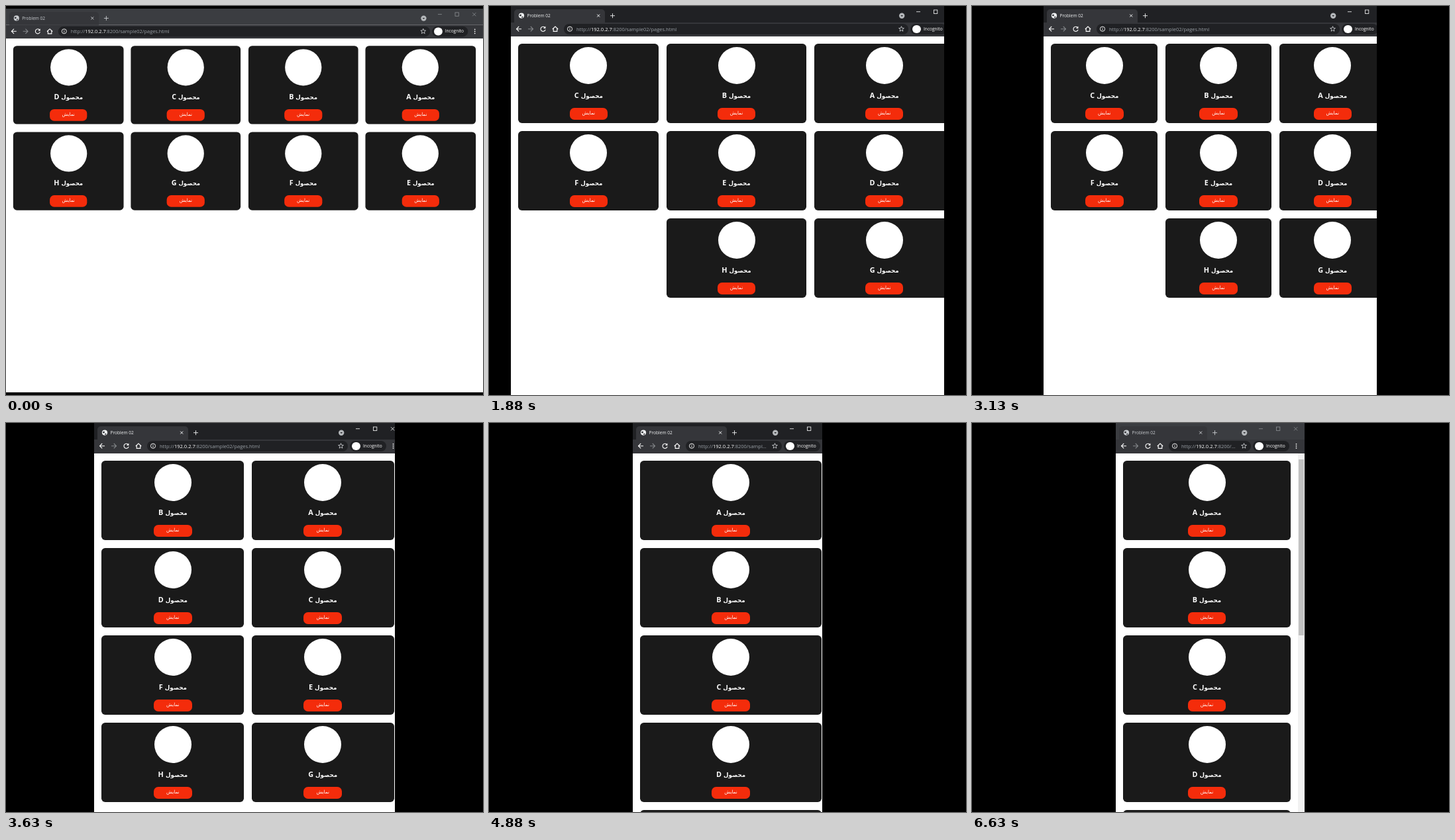
An HTML page that plays this animation: 720x588 px, repeating every 6760 ms.

```html
<!DOCTYPE html>
<html lang="en">
<head>
<meta charset="utf-8">
<title>Responsive product grid</title>
<style>
html, body { margin: 0; width: 100%; height: 100%; overflow: hidden; background: #000; }
#stage { position: relative; width: 720px; height: 588px; overflow: hidden; background: #000; }
#view { position: absolute; left: 0; top: 0; height: 588px; overflow: hidden; transform-origin: 0 0; }
#win {
  position: absolute; left: 0; top: 0; height: 588px; background: #fff;
  font-family: "Open Sans", "Noto Sans", sans-serif; color: #fff;
  --bar: #202124; --ink: #f1f3f4; --ctl: #fff;
}
#win.idle { --bar: #3b3d41; --ink: #c9ccd0; --ctl: #8d9094; }
#win svg, #win div, #win span { position: absolute; }
svg { overflow: visible; fill: none; stroke-linecap: butt; }

.bar { left: 0; right: 0; top: 0; height: 24.5px; background: var(--bar); }
#tab { left: 4.5px; top: 5px; height: 19.5px; background: #35363a; border-radius: 5px 5px 0 0; color: var(--ink); }
#tab span { left: 20px; top: 0; font-size: 6.6px; line-height: 19.5px; white-space: nowrap; }
.tool { left: 0; right: 0; top: 24.5px; height: 21px; background: #35363a; }
.pill { background: #202124; border-radius: 8.3px; top: 26.5px; height: 16.5px; }
.omni { left: 79.5px; right: 81.5px; }
.guest { right: 23px; width: 55px; }
.guest i { position: absolute; left: 3px; top: 2px; width: 12.6px; height: 12.6px; border-radius: 50%; background: #fff; }
.guest span { left: 20px; font-size: 6.6px; font-weight: 500; line-height: 16.5px; }
.url {
  left: 99px; right: 103px; top: 26.5px; font-size: 7.5px; line-height: 16.5px;
  white-space: nowrap; overflow: hidden; text-overflow: ellipsis; color: #9aa0a6;
}
.url b { font-weight: 400; color: #fff; }
.left { left: 0; top: 0; }
.right { right: 0; top: 0; }

#page { left: 0; top: 45.5px; bottom: 0; overflow: hidden; background: #fff; }
#grid {
  left: 0; right: 0; top: 0; padding: 11.4px; direction: rtl;
  display: grid; gap: 11.4px; grid-auto-rows: 120.6px;
}
#win .card { position: relative; background: #1a1a1a; border-radius: 5.7px; }
.card i {
  position: absolute; left: 50%; top: 5.2px; width: 56px; height: 56px;
  margin-left: -28px; border-radius: 50%; background: #fff;
}
.card h3 {
  position: absolute; left: 0; right: 0; top: 70px; margin: 0; text-align: center;
  font: bold 8.7px/16px "DejaVu Sans", sans-serif;
}
.card h3 b { font: bold 10.8px/16px "Open Sans", sans-serif; }
.card p {
  position: absolute; left: 50%; top: 97.6px; width: 57.4px; height: 17.4px; margin: 0 0 0 -28.7px;
  border-radius: 6.8px; background: #f42c0b; text-align: center;
  font: 7.2px/16.6px "DejaVu Sans", sans-serif;
}
#scroll { right: 0; top: 45.5px; bottom: 0; width: 10px; background: #f1f1f1; }
#scroll div { left: .6px; right: .6px; top: 9.6px; height: 266px; background: #c1c1c1; }
#cursor { position: absolute; left: 713.5px; top: 0; }
</style>
</head>
<body>
<div id="stage">
  <div id="view">
    <div id="win">
      <div class="bar"></div>
      <div id="tab">
        <span>Problem 02</span>
        <svg class="left" width="20" height="20">
          <circle cx="11" cy="9.6" r="4.1" fill="var(--ink)"/>
          <path d="M8 8.2l2.2-.6 1 1.3-1.4 1.5-1.6-.4zM11.6 10.6l2 .4-1 1.8-1.4.2z" fill="#35363a"/>
        </svg>
        <svg class="right" width="20" height="20">
          <path d="M8.2 7.6l4 4m0-4l-4 4" stroke="var(--ink)"/>
        </svg>
        <svg style="left:100%;top:0" width="20" height="20">
          <path d="M8 9.7h7m-3.5-3.5v7" stroke="var(--ink)" stroke-width=".9"/>
        </svg>
      </div>
      <div class="tool"></div>
      <div class="pill omni"></div>
      <div class="pill guest"><i></i><span>Incognito</span></div>
      <div class="url">http://<b>192.0.2.7</b>:8200/sample02/pages.html</div>

      <svg class="left" width="100" height="46" stroke="#fff" stroke-width="1.1">
        <path d="M16 34.7H8.6m3.6-3.7l-3.7 3.7 3.7 3.7"/>
        <path d="M26 34.7h7.4m-3.6-3.7l3.7 3.7-3.7 3.7" stroke="#85888c"/>
        <path d="M51.3 32.4a3.6 3.6 0 1 0 .8 3.3"/>
        <path d="M52.4 30.6v3.4H49z" fill="#fff" stroke="none"/>
        <path d="M62.8 35l4.2-3.9 4.2 3.9M64.2 34v4.4h5.6V34"/>
        <circle cx="89" cy="34.7" r="3.6" stroke-width=".9"/>
        <path d="M89 34.2v2.4m0-4v.9" stroke-width=".9"/>
      </svg>

      <svg class="right" width="110" height="46">
        <circle cx="19.2" cy="14.8" r="4.2" fill="#b4b7ba"/>
        <path d="M17.4 14.1l1.8 1.8 1.8-1.8z" fill="#202124"/>
        <g stroke="var(--ctl)" stroke-width=".8">
          <path d="M41 8.7h6M94 6.2l5.2 5.2m0-5.2l-5.2 5.2"/>
          <rect x="67.4" y="6" width="5.4" height="5.4"/>
        </g>
        <path id="star" stroke="#dadce0" stroke-width=".8"/>
        <g fill="#fff">
          <circle cx="97.5" cy="31.8" r=".9"/><circle cx="97.5" cy="34.8" r=".9"/><circle cx="97.5" cy="37.8" r=".9"/>
        </g>
      </svg>

      <div id="page"><div id="grid"></div></div>
      <div id="scroll">
        <div></div>
        <svg class="left" width="10" height="543" fill="#505050">
          <path d="M3 6.6l2-2.4 2 2.4zM3 536.2l2 2.4 2-2.4z"/>
        </svg>
      </div>
    </div>
  </div>
  <svg id="cursor" width="12" height="10">
    <path d="M.8 5L4 2V4.2h3V2L10.2 5 7 8V5.8H4V8z" fill="#fff" stroke="#000" stroke-width=".8"/>
  </svg>
</div>

<script>
const LOOP = 6760, STEP = 125, W = 720, H = 588;
const $ = id => document.getElementById(id);
const [view, win, tab, page, grid, scroll, cursor] =
  ['view', 'win', 'tab', 'page', 'grid', 'scroll', 'cursor'].map($);

// [step, width]: the visible window, and the page layout trailing behind it
const SHOWN = [[10, 730], [15, 654], [21, 541], [27, 484], [29, 454], [33, 380], [39, 286], [40, 285]];
const LAID = [[10, 730], [15, 681], [21, 577], [27, 503], [29, 464], [33, 394], [39, 306], [41, 285]];

grid.innerHTML = [...'ABCDEFGH'].map(c =>
  `<div class="card"><i></i><h3>محصول <b>${c}</b></h3><p>نمایش</p></div>`).join('');

$('star').setAttribute('d', 'M' + Array.from({ length: 10 }, (_, i) => {
  const r = i % 2 ? 1.8 : 4.1, a = i * Math.PI / 5;
  return (18.5 + r * Math.sin(a)).toFixed(2) + ' ' + (34.8 - r * Math.cos(a)).toFixed(2);
}).join('L') + 'z');

function widthAt(keys, n) {
  if (n <= keys[0][0]) return keys[0][1];
  for (let i = 1; i < keys.length; i++) {
    const [n0, w0] = keys[i - 1], [n1, w1] = keys[i];
    if (n <= n1) return Math.round(w0 + (w1 - w0) * (n - n0) / (n1 - n0));
  }
  return keys[keys.length - 1][1];
}

function columns(w) {
  return w > 690 ? 4 : w > 520 ? 3 : w > 348 ? 2 : 1;
}

function draw(n) {
  const shown = widthAt(SHOWN, n), laid = widthAt(LAID, n);
  const cols = columns(laid), k = Math.min(1, W / shown);
  const x = Math.floor((W - shown * k) / 2), y = Math.floor((H - H * k) / 2);

  view.style.width = shown + 'px';
  view.style.transform = `translate(${x}px, ${y}px) scale(${k})`;
  win.style.width = laid + 'px';
  win.className = n < 10 || n >= 53 ? 'idle' : '';
  tab.style.width = Math.min(137, laid - 152) + 'px';

  page.style.width = laid - (cols === 1 ? 10 : 0) + 'px';
  grid.style.gridTemplateColumns = `repeat(${cols}, 1fr)`;
  scroll.style.display = cols === 1 ? '' : 'none';

  cursor.style.display = n >= 7 && n <= 10 ? '' : 'none';
  cursor.style.transform = `translateY(${n < 8 ? 521 : 513}px)`;
}

let last = -1;
const start = performance.now();
function tick() {
  const t = (performance.now() - start) % LOOP;
  const n = Math.floor(Math.floor(t / 10) * 10 / STEP);
  if (n !== last) draw(last = n);
  requestAnimationFrame(tick);
}
tick();
</script>
</body>
</html>
```
